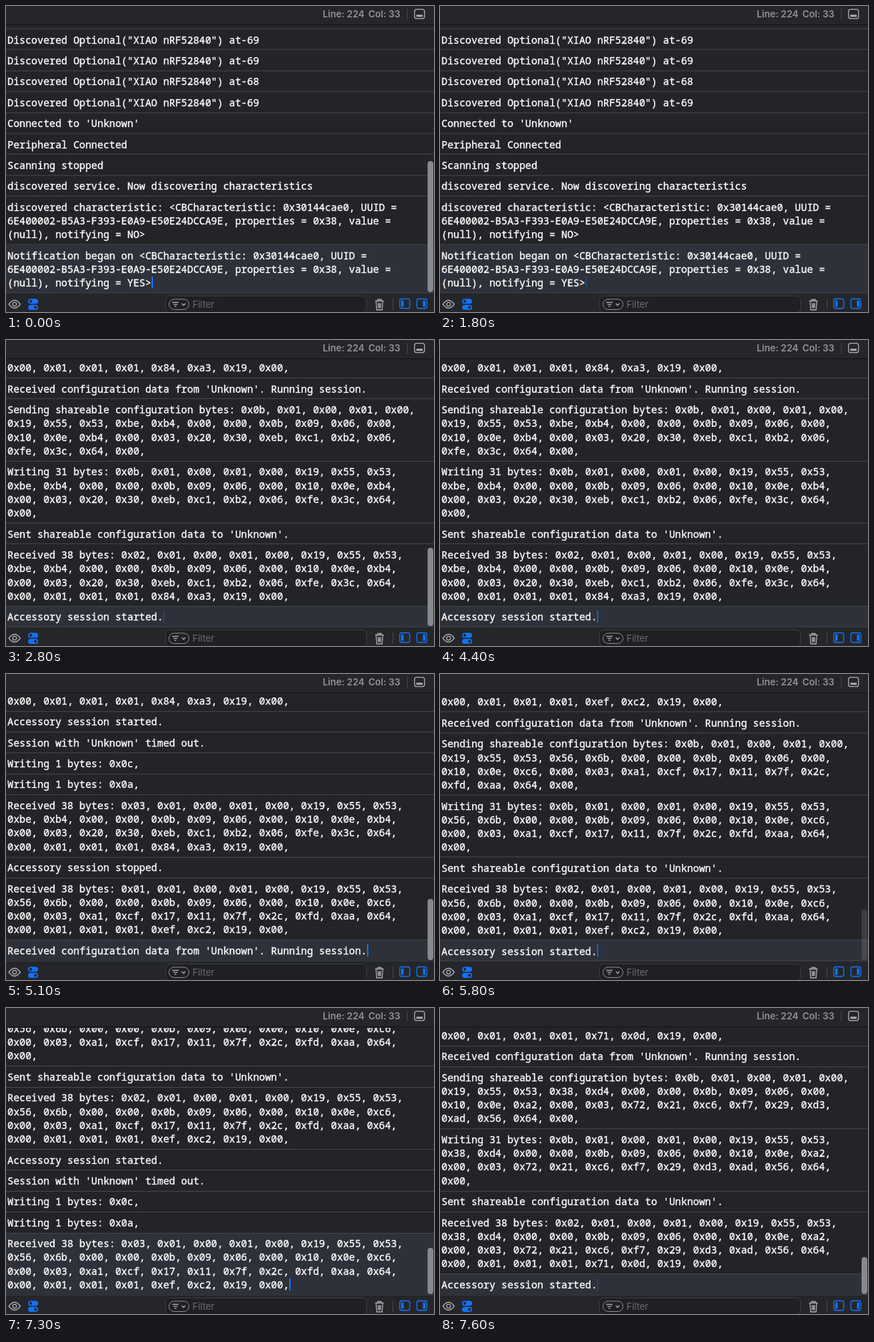
These frames come from a looping animation (600 by 430 pixels, 8 s). An HTML page:

```html
<!DOCTYPE html>
<html lang="en">
<head>
<meta charset="utf-8">
<title>Debug console</title>
<style>
  html, body { margin: 0; width: 100%; height: 100%; overflow: hidden; background: #232428; }
  #stage { position: relative; width: 600px; height: 430px; overflow: hidden; }
  #stage > * { position: absolute; left: 0; }
  #log { top: 0; width: 600px; font: 500 14px/19.3px "Noto Sans Mono", monospace; color: #fff;
    white-space: pre; -webkit-text-stroke: .35px #fff; }
  .row { position: absolute; left: 0; width: 598px; padding: 4.7px 0 5.4px 2px; }
  .row::before { content: ""; position: absolute; left: 0; top: -1px; width: 600px; height: 1px; background: #46474b; }
  #mark { width: 600px; background: #2e3139; }
  #cursor { width: 2px; height: 17px; top: 380px; background: #0a72ff; }
  #stage > #thumb { left: 591px; width: 8px; border-radius: 4px; background: #88898d; }
  #chrome { top: 0; }
  #chrome text { font-family: Inter, sans-serif; font-size: 13px; }
</style>
</head>
<body>
<div id="stage">
  <div id="mark"></div>
  <div id="log"></div>
  <div id="cursor"></div>
  <div id="thumb"></div>
  <svg id="chrome" width="600" height="430" fill="none">
    <path fill="#25262a" d="M0 0H600V28H0zM0 403H600V430H0z"/>
    <path fill="#101113" d="M0 26H600V27H0z"/>
    <path fill="#36373b" d="M0 403H600V404H0z"/>
    <g fill="#929397" font-weight="600">
      <text x="444" y="15.5">Line: 224</text>
      <text x="508" y="15.5">Col: 33</text>
    </g>
    <path stroke="#46474b" d="M562.5 4V19M542.5 411V427"/>
    <g stroke="#a9aaae" stroke-width="1.3">
      <rect x="572.7" y="4.7" width="14" height="13" rx="3"/>
      <rect x="575.2" y="12.2" width="9" height="3" rx=".6" fill="#a9aaae" stroke="none"/>
      <path d="M4 419Q12 408 20 419Q12 430 4 419Z"/>
      <circle cx="12" cy="419" r="2.7"/>
      <path d="M517.5 414.5H529.5M521 414.5V412.5H526V414.5M518.8 414.5L519.7 427H527.3L528.2 414.5M521.7 417.5L522 424.5M523.5 417.5V424.5M525.3 417.5L525 424.5"/>
    </g>
    <g fill="#1273fb">
      <rect x="31" y="411.5" width="14" height="7" rx="3.5"/>
      <rect x="31" y="420" width="14" height="7" rx="3.5"/>
      <circle cx="34.7" cy="415" r="2" fill="#25262a"/>
      <circle cx="41.3" cy="423.5" r="2" fill="#25262a"/>
      <rect x="554" y="413.8" width="3.5" height="9" rx=".8"/>
      <rect x="584.5" y="413.8" width="3.5" height="9" rx=".8"/>
    </g>
    <g stroke="#1273fb" stroke-width="1.3">
      <rect x="552" y="411.5" width="14" height="13.5" rx="2.8"/>
      <rect x="576" y="411.5" width="14" height="13.5" rx="2.8"/>
    </g>
    <rect x="223.5" y="407.5" width="282" height="23" rx="5.5" fill="#1f2023" stroke="#3b3c40"/>
    <rect x="228.5" y="412" width="28" height="14.5" rx="7.2" stroke="#8c8d91"/>
    <path stroke="#a4a5a9" stroke-width="1.3" d="M233 416.5H242M234.7 419.3H240.3M236.3 422H238.7M246.5 418L249 420.7L251.5 418"/>
    <text x="261.5" y="423.5" fill="#6c6d71">Filter</text>
  </svg>
</div>
<script>
const LOOP = 8000, TICK = 100, BOTTOM = 403.8, LINE = 19.3, PAD = 10.1, CHAR = 8.4, COLS = 70;
const $ = id => document.getElementById(id);
const clamp = x => Math.min(1, Math.max(0, x));

// each ranging session prints its messages between start and end
const sessions = [
  { addr: "be b4", key: "b4 00 03 20 30 eb c1 b2 06 fe 3c", clock: "84 a3", start: 2200, end: 2800 },
  { addr: "56 6b", key: "c6 00 03 a1 cf 17 11 7f 2c fd aa", clock: "ef c2", start: 4700, end: 5200 },
  { addr: "38 d4", key: "a2 00 03 72 21 c6 f7 29 d3 ad 56", clock: "71 0d", start: 6800, end: 7600 },
];
const hex = s => s.split(" ").map(b => `0x${b},`).join(" ");
const body = s => `01 00 01 00 19 55 53 ${s.addr} 00 00 0b 09 06 00 10 0e ${s.key} 64 00`;
const received = (type, s) => "Received 38 bytes: " + hex(`${type} ${body(s)} 01 01 01 ${s.clock} 19 00`);
const characteristic = state => "<CBCharacteristic: 0x30144cae0, UUID = " +
  `6E400002-B5A3-F393-E0A9-E50E24DCCA9E, properties = 0x38, value = (null), notifying = ${state}>`;

const messages = [
  ...[69, 69, 68, 69].map(n => `Discovered Optional("XIAO nRF52840") at-${n}`),
  "Connected to 'Unknown'",
  "Peripheral Connected",
  "Scanning stopped",
  "discovered service. Now discovering characteristics",
  "discovered characteristic: " + characteristic("NO"),
  "Notification began on " + characteristic("YES"),
];
const firstCount = messages.length;

sessions.forEach((s, i) => {
  s.before = messages.length;
  if (i) messages.push("Session with 'Unknown' timed out.", "Writing 1 bytes: 0x0c,");
  messages.push("Writing 1 bytes: 0x0a,");
  if (i) messages.push(received("03", sessions[i - 1]), "Accessory session stopped.");
  const shared = hex("0b " + body(s));
  messages.push(
    received("01", s),
    "Received configuration data from 'Unknown'. Running session.",
    "Sending shareable configuration bytes: " + shared,
    "Writing 31 bytes: " + shared,
    "Sent shareable configuration data to 'Unknown'.",
    received("02", s),
    "Accessory session started.");
  s.after = messages.length;
});

function wrap(text) {
  const lines = [];
  let line = "";
  for (const word of text.split(" ")) {
    const next = line ? line + " " + word : word;
    if (next.length > COLS) { lines.push(line); line = word; }
    else line = next;
  }
  return [...lines, line];
}

let total = 0;
const rows = messages.map(text => {
  const lines = wrap(text), el = document.createElement("div");
  const height = lines.length * LINE + PAD;
  el.className = "row";
  el.textContent = lines.join("\n");
  el.style.top = total + "px";
  $("log").append(el);
  total += height;
  return { end: total, height, width: lines[lines.length - 1].length * CHAR };
});

function show(count) {
  const last = rows[count - 1];
  const thumb = 127700 / (last.end + 323);
  $("log").style.transform = `translateY(${BOTTOM - last.end}px)`;
  $("mark").style.top = BOTTOM - last.height + "px";
  $("mark").style.height = last.height + "px";
  $("cursor").style.left = 2 + last.width + "px";
  $("thumb").style.top = 402 - thumb + "px";
  $("thumb").style.height = thumb + "px";
}

// printing speeds up through a burst
function countAt(t, s) {
  if (!s) return firstCount;
  const tick = Math.floor(t / TICK) * TICK;
  const p = clamp((tick - s.start) / (s.end - s.start));
  return s.before + Math.floor((s.after - s.before) * p * p);
}

// the caret stays lit while printing, then dips once a second
function caret(idle) {
  const fromDark = Math.abs((idle + 660) % 1000 - 500);
  return idle < 0 ? 1 : clamp((fromDark - 110) / 180);
}

let shown = 0;
function draw(now) {
  const t = now % LOOP;
  const session = sessions.filter(s => s.start + TICK <= t).pop();
  const idle = t - (session ? session.end : -200);
  const count = countAt(t, session);
  if (count !== shown) show(shown = count);
  $("cursor").style.opacity = caret(idle);
  $("thumb").style.opacity = clamp((680 - idle) / 300);
}

const start = performance.now();
function tick() {
  draw(performance.now() - start);
  requestAnimationFrame(tick);
}
tick();
</script>
</body>
</html>
```
